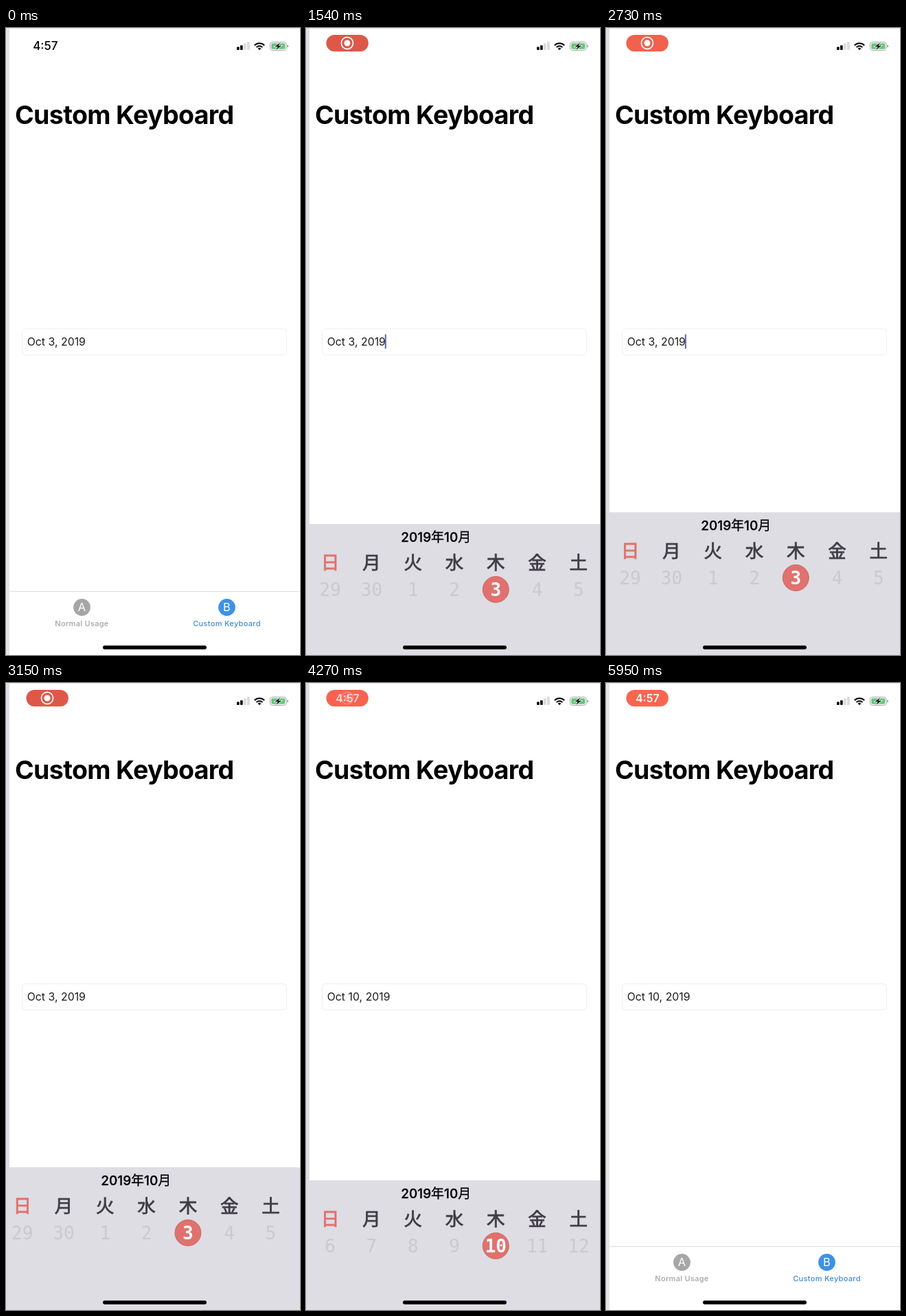
An HTML page that plays this animation: 428 px wide and 914 px high, repeating every 6.09 s.

```html
<!DOCTYPE html>
<html lang="ja">
<head>
<meta charset="utf-8">
<title>Custom Keyboard</title>
<style>
  html, body { margin: 0; width: 100%; height: 100%; overflow: hidden; background: #fff; }
  svg { display: block; width: 428px; height: 914px; }
  text { font-family: Inter, "Noto Sans CJK JP", "Noto Sans CJK", sans-serif; white-space: pre; }
  .mid { text-anchor: middle; }
  .title { font-size: 37.5px; font-weight: 700; letter-spacing: -.64px; }
  .time { font-size: 17px; font-weight: 500; }
  .date { font-size: 15.8px; letter-spacing: .03px; fill: #1c1c1c; }
  .tab { font-size: 11px; font-weight: 500; letter-spacing: .3px; }
  .icon { font-size: 16.5px; fill: #fff; }
  .month { font-size: 19px; font-weight: 500; stroke: #000; stroke-width: .3px; }
  .weekday { font-size: 26.5px; fill: #403d44; stroke: #403d44; stroke-width: .8px; }
  .weekday.sunday { fill: #e2706b; stroke: #e2706b; }
  .day { font-family: "DejaVu Sans Mono", monospace; font-size: 26px; fill: #cac9ce; }
  .day.selected { font-weight: 700; fill: #fff; }
</style>
</head>
<body>
<svg viewBox="0 0 428 914">
  <defs><clipPath id="pageClip"><rect x="5" y="0" width="423" height="914"/></clipPath></defs>
  <rect width="428" height="914" fill="#fff"/>
  <rect width="428" height="1" fill="#e6e6e6"/>

  <text class="time" id="clock" x="39.2" y="32.3">4:57</text>
  <g id="pill">
    <rect id="pillBody" x="29.5" y="10" width="61.3" height="24.2" rx="12"/>
    <g id="record">
      <circle cx="60" cy="22" r="8.6" fill="none" stroke="#fff" stroke-width="1.6"/>
      <circle cx="60" cy="22" r="4.5" fill="#fff"/>
    </g>
    <text class="mid" id="pillTime" x="60.3" y="27.8" fill="#fff" font-size="16" font-weight="600">4:57</text>
  </g>

  <g id="bars"></g>
  <g fill="none" stroke="#000" stroke-width="2">
    <path d="M361.8 25.2A10 10 0 0 1 376.2 25.2"/>
    <path d="M364.6 28.1A6.2 6.2 0 0 1 373.4 28.1"/>
  </g>
  <path d="M369 32.2L366.7 29.9A3.3 3.3 0 0 1 371.3 29.9Z"/>
  <rect x="384.5" y="20.5" width="23.5" height="12" rx="3.4" fill="#fff" stroke="#a8a8a8"/>
  <rect x="386.2" y="22.2" width="20.1" height="8.6" rx="2" fill="#64c67d"/>
  <path d="M409.2 24.6a2 2 0 0 1 0 4z" fill="#a8a8a8"/>
  <path d="M399.3 21.2L391.4 27.3H395.8L392.9 31.9L401 25.7H396.5Z" stroke="#fff" stroke-width="1.4" paint-order="stroke"/>

  <text class="title" x="13" y="140">Custom Keyboard</text>
  <rect x="23.5" y="438.5" width="385" height="38" rx="5" fill="#fff" stroke="#efefef"/>
  <text class="date" id="date" x="30.7" y="462.8"></text>
  <rect id="caret" x="114.8" y="446.5" width="2" height="21" fill="#5866a8"/>

  <path d="M5 821.5H428" stroke="#dedede"/>
  <circle cx="110.5" cy="844.5" r="12.4" fill="#a6a6a6"/>
  <text class="icon mid" x="110.5" y="850.4">A</text>
  <text class="tab mid" x="110.5" y="872" fill="#a3a3a3">Normal Usage</text>
  <circle cx="321.5" cy="844.5" r="12.4" fill="#3f91e6"/>
  <text class="icon mid" x="321.5" y="850.4">B</text>
  <text class="tab mid" x="321.5" y="872" fill="#418ace">Custom Keyboard</text>

  <g id="keyboard" clip-path="url(#pageClip)">
    <rect x="5" width="423" height="208" fill="#dedde4"/>
    <text class="month mid" x="189.3" y="25.7">2019年10月</text>
    <g id="pages"></g>
  </g>

  <rect id="edge" width="5" height="914"/>
  <rect x="141" y="900.3" width="151" height="5.4" rx="2.7"/>
</svg>
<script>
const LOOP = 6090, STEP = 70;
const KEYBOARD_TOP = 706, KEYBOARD_HEIGHT = 208;
const PAGE_WIDTH = 422, CELL = PAGE_WIDTH / 7;
const SHOW = 1312, PICK = 4200, HIDE = 4242;

const byId = id => document.getElementById(id);
const ui = Object.fromEntries(
  ["clock", "pill", "pillBody", "record", "pillTime", "date", "caret", "keyboard", "pages", "edge"]
    .map(id => [id, byId(id)]));

byId("bars").innerHTML = [4.5, 6.8, 9.4, 12].map((h, i) =>
  `<rect x="${336 + i * 5}" y="${32 - h}" width="3.7" height="${h}" rx=".8" fill="${i < 2 ? "#000" : "#dadada"}"/>`).join("");

function pageMarkup(days, left, selected) {
  return days.map((day, i) => {
    const x = left + (i + .5) * CELL, on = day === selected;
    const disc = on ? `<circle cx="${x}" cy="95.5" r="19" fill="#df726e" stroke="#cf6663"/>` : "";
    return `<text class="weekday mid ${i ? "" : "sunday"}" x="${x}" y="65.6">${"日月火水木金土"[i]}</text>${disc}` +
      `<text class="day mid ${on ? "selected" : ""}" x="${x}" y="105">${day}</text>`;
  }).join("");
}

function drawPages(picked) {
  ui.pages.innerHTML =
    pageMarkup([29, 30, 1, 2, 3, 4, 5], 5, picked ? 0 : 3) +
    pageMarkup([6, 7, 8, 9, 10, 11, 12], 5 + PAGE_WIDTH, picked ? 10 : 0);
  ui.date.textContent = picked ? "Oct 10, 2019" : "Oct 3, 2019";
}

const ramp = (t, from, to) => Math.min(1, Math.max(0, (t - from) / (to - from)));
const mix = (a, b, k) => a.map((v, i) => Math.round(v + (b[i] - v) * k));

// Critically damped spring, 0 to 1
function spring(ms) {
  const x = Math.max(0, ms) * .01826;
  return 1 - (1 + x) * Math.exp(-x);
}

// Finger drag, then paging deceleration
function swipe(t) {
  if (t < 3220) return .3 * ramp(t, 3120, 3220) ** 2;
  return t > 3560 ? 1 : 1 - .7 * Math.exp(-(t - 3220) * .0235);
}

function pulse(t) {
  return t > 4515 ? 1 : (1 - Math.cos((t - 1260) / 2170 * 2 * Math.PI)) / 2;
}

let wasPicked = null;
function render(t) {
  const picked = t >= PICK;
  if (picked !== wasPicked) drawPages(wasPicked = picked);

  const shown = t < HIDE ? spring(t - SHOW) : 1 - spring(t - HIDE);
  const drop = t > 4690 ? KEYBOARD_HEIGHT : KEYBOARD_HEIGHT * (1 - shown);
  ui.keyboard.setAttribute("transform", `translate(0 ${Math.round(KEYBOARD_TOP + drop)})`);
  ui.pages.setAttribute("transform", `translate(${-PAGE_WIDTH * swipe(t)} 0)`);

  const pill = ramp(t, 200, 420), toTime = ramp(t, 4060, 4340);
  ui.clock.style.opacity = 1 - pill;
  ui.pill.style.opacity = pill;
  ui.pillBody.style.fill = `rgb(${mix([216, 86, 70], [251, 101, 80], pulse(t))})`;
  ui.record.style.opacity = 1 - toTime;
  ui.pillTime.style.opacity = toTime;

  const blinkOn = t < 1480 || (t - 1480) % 1000 < 600;
  ui.caret.style.opacity = t >= 1350 && t < PICK && blinkOn ? 1 : 0;
  ui.edge.style.fill = t >= 1400 && t < 4410 ? "#dedde4" : "#e4e4e4";
}

const start = performance.now();
function frame() {
  const t = Math.max(0, performance.now() - start) % LOOP;
  render(Math.floor(t / STEP) * STEP);
  requestAnimationFrame(frame);
}
frame();
</script>
</body>
</html>
```
